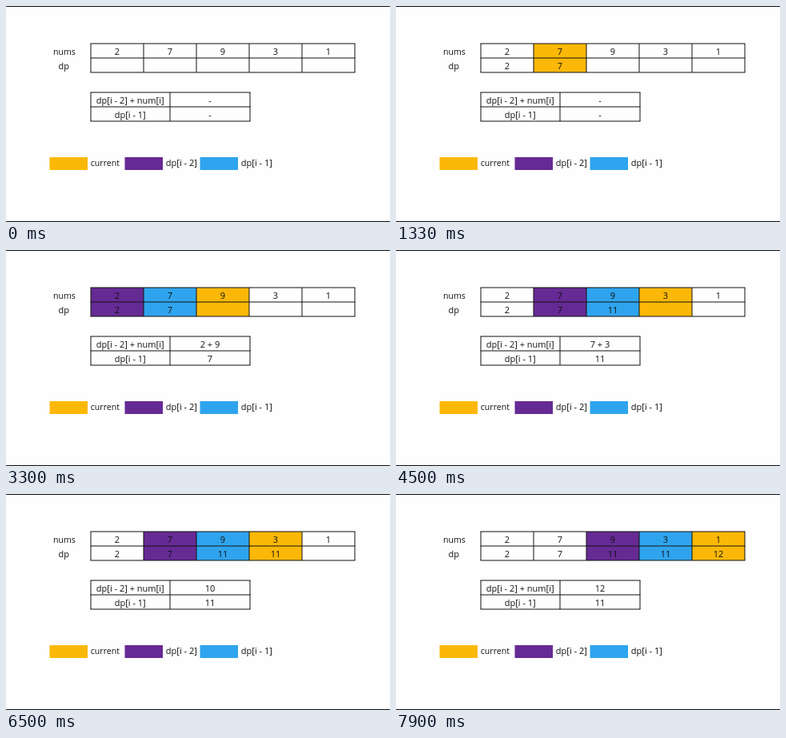
Animation, 480 px wide and 270 px high, one loop 8000 ms. Source, as an HTML page:

```html
<!DOCTYPE html>
<html lang="en">
<head>
<meta charset="utf-8">
<title>Table filling</title>
<style>
  html, body { margin: 0; width: 100%; height: 100%; overflow: hidden; background: #fefefe; }
  svg { display: block; width: 100vw; height: 100vh; }
  text { font: 11px "Open Sans", "Noto Sans", sans-serif; fill: #111; }
  .word { font-size: 10.6px; }
  .mid { text-anchor: middle; }
  .grid { fill: none; stroke: #111; stroke-width: 1; }
</style>
</head>
<body>
<svg id="stage" viewBox="0 0 480 270"></svg>
<script>
const LOOP = 8000;
const NUMS = [2, 7, 9, 3, 1];
const GOLD = '#fcb808', PURPLE = '#662a94', BLUE = '#2fa4ee';
const LEFT = 106, COL = 66;

// time, current column, filled dp values, upper and lower candidate
const STEPS = [
  [0, -1, [], '-', '-'],
  [330, 0, [], '-', '-'],
  [630, 0, [2], '-', '-'],
  [900, 1, [2], '-', '-'],
  [1200, 1, [2, 7], '-', '-'],
  [1560, 2, [2, 7], '2 + 9', '7'],
  [3480, 2, [2, 7], '11', '7'],
  [3720, 2, [2, 7, 11], '11', '7'],
  [3970, 3, [2, 7, 11], '7 + 3', '11'],
  [4900, 3, [2, 7, 11], '10', '11'],
  [5640, 3, [2, 7, 11, 11], '10', '11'],
  [6820, 4, [2, 7, 11, 11], '11 + 1', '11'],
  [7230, 4, [2, 7, 11, 11], '12', '11'],
  [7570, 4, [2, 7, 11, 11, 12], '12', '11']
];

const stage = document.getElementById('stage');

function add(tag, attrs, content = '') {
  const el = document.createElementNS('http://www.w3.org/2000/svg', tag);
  for (const key in attrs) el.setAttribute(key, attrs[key]);
  el.textContent = content;
  return stage.appendChild(el);
}
const box = (x, y, width, height, fill) => add('rect', { x, y, width, height, fill });
const label = (x, y, str, cls = '') => add('text', { x, y, class: cls }, str);
const colMid = i => LEFT + COL * (i + 0.5);

function grid(xs, ys) {
  const [x0, x1] = [xs[0], xs[xs.length - 1]];
  const [y0, y1] = [ys[0], ys[ys.length - 1]];
  const d = ys.map(y => `M${x0 - 0.5} ${y}H${x1 + 0.5}`)
    .concat(xs.map(x => `M${x} ${y0}V${y1}`)).join('');
  add('path', { d, class: 'grid' });
}

// stage edges
box(0, 0, 480, 1, '#111');
box(0, 269, 480, 1, '#111');

// main table
const cells = NUMS.map((_, i) => box(LEFT + COL * i, 47, COL, 36, 'none'));
grid([0, 1, 2, 3, 4, 5].map(i => LEFT + COL * i), [47, 65, 83]);
label(59, 61, 'nums', 'word');
label(65.5, 79, 'dp');
NUMS.forEach((n, i) => label(colMid(i), 61, n, 'mid'));
const dp = NUMS.map((_, i) => label(colMid(i), 79, '', 'mid'));

// candidates
grid([LEFT, 205, 305], [108, 126, 144]);
label(155.2, 121.5, 'dp[i - 2] + num[i]', 'mid');
label(155.2, 139.5, 'dp[i - 1]', 'mid');
const upper = label(255, 121.5, '', 'mid');
const lower = label(255, 139.5, '', 'mid');

// legend
[[GOLD, 'current', 'word'], [PURPLE, 'dp[i - 2]'], [BLUE, 'dp[i - 1]']].forEach(([fill, str, cls], i) => {
  const x = 54.5 + 94 * i;
  box(x, 189, 47.5, 16, fill);
  label(x + 51.3, 200, str, cls);
});

function cellColor(i, cur) {
  if (i === cur) return GOLD;
  if (cur < 2) return 'none';
  return i === cur - 1 ? BLUE : i === cur - 2 ? PURPLE : 'none';
}

let shown = null;
function show(step) {
  if (step === shown) return;
  shown = step;
  const [, cur, values, top, bottom] = step;
  cells.forEach((cell, i) => cell.setAttribute('fill', cellColor(i, cur)));
  dp.forEach((el, i) => { el.textContent = values[i] ?? ''; });
  upper.textContent = top;
  lower.textContent = bottom;
}

const start = performance.now();
function tick() {
  const t = (performance.now() - start) % LOOP;
  show(STEPS.filter(s => s[0] <= t).pop());
  requestAnimationFrame(tick);
}
tick();
</script>
</body>
</html>
```
